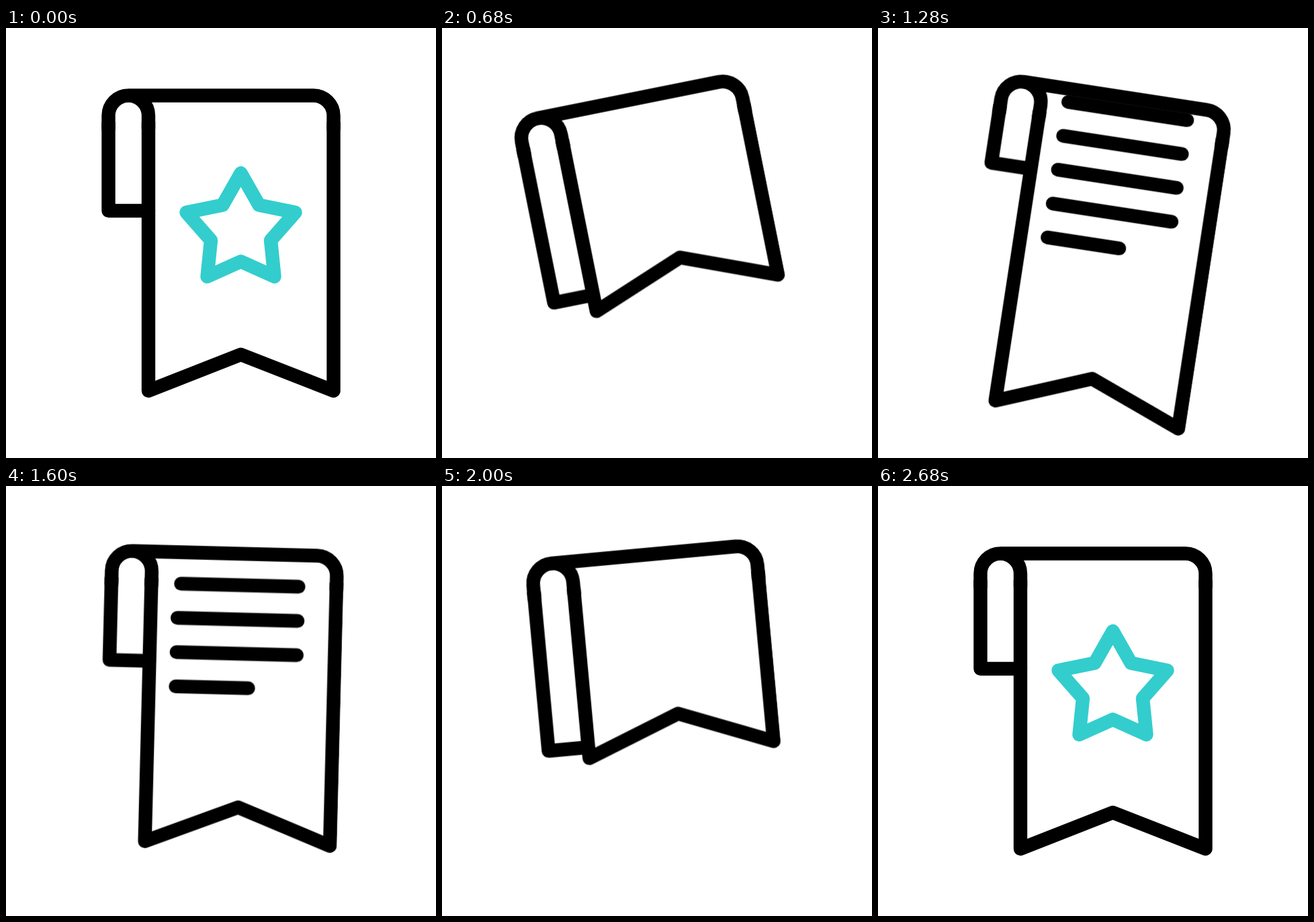
Animation, 640 px wide and 640 px high, one loop 3000 ms. Source, as an HTML page without scripts:

```html
<!DOCTYPE html>
<html lang="en">
<head>
<meta charset="utf-8">
<title>Bookmark</title>
<style>
  html, body { margin: 0; width: 100%; height: 100%; overflow: hidden; background: #fff; }
  svg { display: block; width: 100%; height: 100%; }
  path { fill: none; stroke: #000; stroke-width: 20.4; stroke-linecap: round; stroke-linejoin: round; }

  .sway, .roll, .star, .lines, .lead {
    --swing: cubic-bezier(.333, 0, .667, 1);
    animation: 3s infinite cubic-bezier(.25, 0, .42, 1);
  }
  .sway { transform-origin: 333px 320px; animation-name: sway; animation-timing-function: var(--swing); }
  .roll { animation-name: roll; }
  .tail { --rolled: -147px; --stretched: 44px; }
  .flap { --rolled: 107px; --stretched: -52px; }
  .star { stroke: #33cdcd; animation-name: star; }
  .lines { animation-name: lines; }
  .lead { animation-name: shorten; animation-timing-function: var(--swing); }

  @keyframes sway {
    0%, 6.667%, 81.333%, 100% { transform: rotate(0deg); }
    25.333% { transform: rotate(-12deg); }
    44% { transform: rotate(9deg); }
    62.667% { transform: rotate(-6deg); }
  }
  @keyframes roll {
    0%, 6.667%, 89.333%, 100% { transform: translateY(0); }
    26.667%, 68.333%, 69.333% { transform: translateY(var(--rolled)); }
    46.667%, 48.4% { transform: translateY(var(--stretched)); }
  }
  @keyframes star {
    0%, 6.667%, 89.333%, 100% { transform: translateY(0); }
    26.667%, 69.333% { transform: translateY(-294px); }
  }
  @keyframes lines {
    0%, 26.667%, 68.333%, 100% { transform: translateY(0); }
    46.667%, 50.5% { transform: translateY(281px); }
  }
  @keyframes shorten {
    0%, 44% { d: path("M252 -98 H431"); }
    62.667%, 100% { d: path("M260 -98 H431"); }
  }
</style>
</head>
<body>
<svg viewBox="0 0 640 640" role="img" aria-label="Bookmark ribbon with a star">
  <defs>
    <clipPath id="page"><rect x="212" y="101" width="276" height="520"/></clipPath>
    <clipPath id="below-fold"><rect y="140" width="640" height="500"/></clipPath>
  </defs>
  <g class="sway">
    <g clip-path="url(#page)">
      <path class="star" d="M349.5 216 l27 47.5 l54 11 l-36.5 41.5 l5.5 54 l-50 -22.5 l-50 22.5 l5.5 -54 l-36.5 -41.5 l54 -11 z"/>
      <g class="lines">
        <path d="M252 55 h108 M252 4 h179 m-179 -51 h179 m-179 -102 h179"/>
        <path class="lead" d="M252 -98 H431"/>
      </g>
    </g>
    <!-- The sides run on above the fold, so sliding them changes their visible length -->
    <g clip-path="url(#below-fold)">
      <path class="roll flap" d="M152.5 -100 V272 H212"/>
      <path class="roll tail" d="M212 -100 V540 l137.5 -54 l138 54 V-100"/>
    </g>
    <path d="M152.5 150 V130.5 a29.75 30 0 0 1 59.5 0 V150 M182 100.5 H457.5 a30 30 0 0 1 30 30 V150"/>
  </g>
</svg>
</body>
</html>
```
